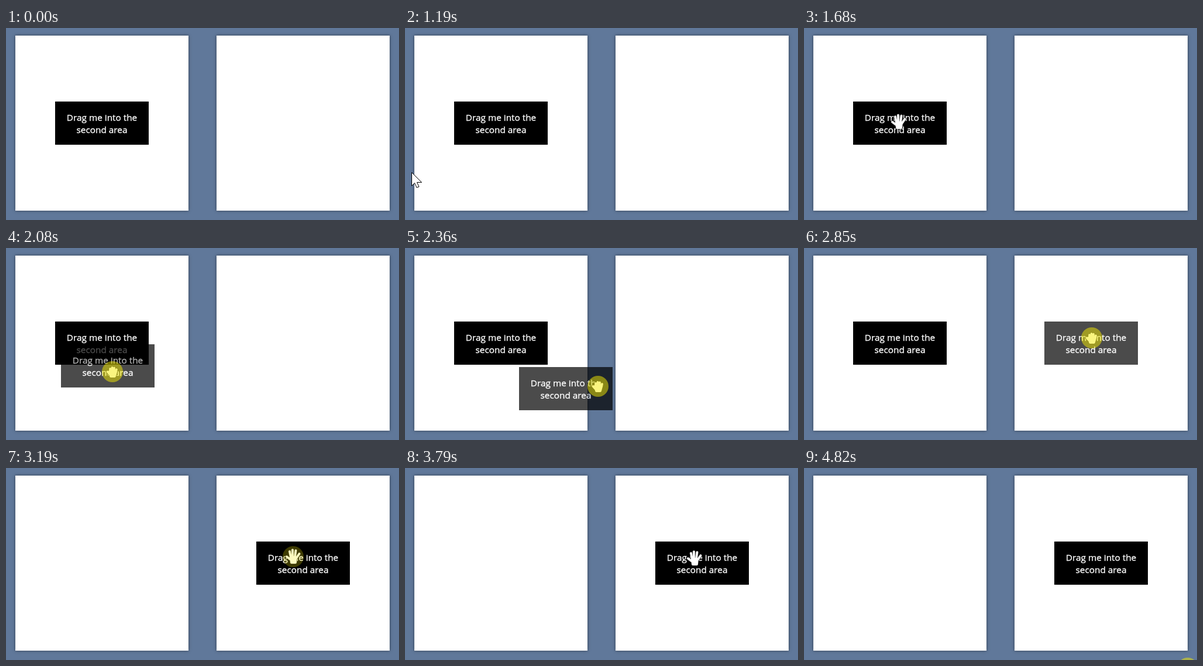
An HTML page for the animation above (4.89 s loop, 672 px wide and 329 px high).

```html
<!DOCTYPE html>
<html lang="en">
<head>
<meta charset="utf-8">
<title>Drag and drop</title>
<style>
html, body { margin: 0; width: 100%; height: 100%; overflow: hidden; background: #60789a; }
body { position: relative; }
.area, .item { position: absolute; box-sizing: border-box; }
.area { top: 13px; width: 296px; height: 300px; background: #fff; box-shadow: 0 0 5px rgba(0, 0, 0, .5); }
.item {
  left: 0; top: 0; width: 160px; height: 74px; padding-top: 17px;
  background: #000; color: #fff; text-align: center;
  font: 15.35px/21px "Open Sans", "Noto Sans", sans-serif;
  -webkit-text-stroke: .35px #fff;
}
#ghost { opacity: .7; }
svg { position: absolute; left: 0; top: 0; }
.hand { fill: #fff; stroke-linejoin: round; stroke-linecap: round; }
.outline { stroke: #222; stroke-width: 5.2; }
.shape { stroke: #fff; stroke-width: 3.8; }
</style>
</head>
<body>
<div class="area" style="left:16px"></div>
<div class="area" style="left:360px"></div>
<div class="item" id="item">Drag me into the<br>second area</div>
<div class="item" id="ghost">Drag me into the<br>second area</div>
<svg width="672" height="329">
  <defs>
    <path id="openHand" d="M-4 1L-6-9M-1 0V-11.5M3 0L4.5-10.5M5 3L10.5-5M-3 6L-11 0M-4 1H5L4 10H-3Z"/>
    <path id="closedHand" d="M-4-1V-5M-.5-1V-7M3-1V-6.500M6 1L7-4M-4 5L-8.500 0M-5-1H6.500L4 8H-3Z"/>
  </defs>
  <g id="cursor">
    <path id="arrow" fill="#fff" stroke="#000"
      d="M.5.5V23.5L5.5 18.5L9 26.5L13 25L9.5 17.5H17.5Z"/>
    <g id="open" class="hand">
      <use href="#openHand" class="outline"/>
      <use href="#openHand" class="shape"/>
    </g>
    <g id="closed" class="hand">
      <use href="#closedHand" class="outline"/>
      <use href="#closedHand" class="shape"/>
    </g>
    <circle id="press" r="18" fill="rgb(245,235,0)" fill-opacity=".5"/>
  </g>
</svg>
<script>
const LOOP = 4890, STEP = 70;
const HOME = [84, 126], DROPPED = [428, 126], GRAB = [162, 161];
const PRESS = 1750, DROP = 3190, RELEASE = 3270, CLICK = 4820;

// Each move is a smooth curve through points spaced evenly in time.
const enter = { start: 1190, end: 1680, points: [[11, 247], [116, 188], GRAB] };
const drag = { start: 1940, end: 2920, points: [
  [166, 190], [182, 212], [222, 236], [330, 237],
  [411, 219], [454, 197], [489, 161], [491, 152]] };
const leave = { start: 3510, end: 4350, points: [
  [491, 150], [493, 152], [495, 155], [542, 162], [600, 200], [642, 285], [656, 343]] };
const MOVES = [enter, drag, leave];

const el = id => document.getElementById(id);
const show = (id, on) => el(id).style.display = on ? "" : "none";
const place = (id, [x, y]) => el(id).style.transform = `translate(${x}px,${y}px)`;
const clamp = (v, low, high) => Math.min(high, Math.max(low, v));
const moveAt = t => MOVES.filter(m => m.start <= t).pop() || enter;

// Catmull-Rom curve, u from 0 to 1
function spline(points, u) {
  const last = points.length - 1;
  const i = Math.min(Math.floor(u * last), last - 1);
  const f = u * last - i;
  const [a, b, c, d] = [-1, 0, 1, 2].map(k => points[clamp(i + k, 0, last)]);
  return b.map((p, k) => p + f / 2 * (c[k] - a[k]
    + f * (2 * a[k] - 5 * p + 4 * c[k] - d[k] + f * (3 * (p - c[k]) + d[k] - a[k]))));
}

function pointerAt(t) {
  const { start, end, points } = moveAt(t);
  return spline(points, clamp((t - start) / (end - start), 0, 1)).map(Math.round);
}

function draw(t) {
  // The pointer is sampled in steps; the dragged copy trails by one step.
  const { start } = moveAt(t);
  const sample = start + Math.floor((t - start) / STEP) * STEP;
  const pointer = pointerAt(sample), trail = pointerAt(sample - STEP);

  const home = t < DROP ? HOME : DROPPED;
  const [dx, dy] = pointer.map((v, i) => v - home[i]);
  const over = dx >= 0 && dx < 160 && dy >= 0 && dy < 74;
  const closed = t >= PRESS && t < DROP;

  place("item", home);
  place("ghost", HOME.map((v, i) => v + trail[i] - GRAB[i]));
  show("ghost", t >= drag.start && t < DROP);

  el("cursor").setAttribute("transform", `translate(${pointer})`);
  show("cursor", t >= enter.start);
  show("closed", closed);
  show("open", over && !closed);
  show("arrow", !over && !closed);
  show("press", t >= PRESS && t < RELEASE || t >= CLICK);
  el("press").setAttribute("opacity", t >= DROP && t < RELEASE ? .5 : 1);
}

const begin = performance.now();
function tick() {
  draw((performance.now() - begin) % LOOP);
  requestAnimationFrame(tick);
}
tick();
</script>
</body>
</html>
```
